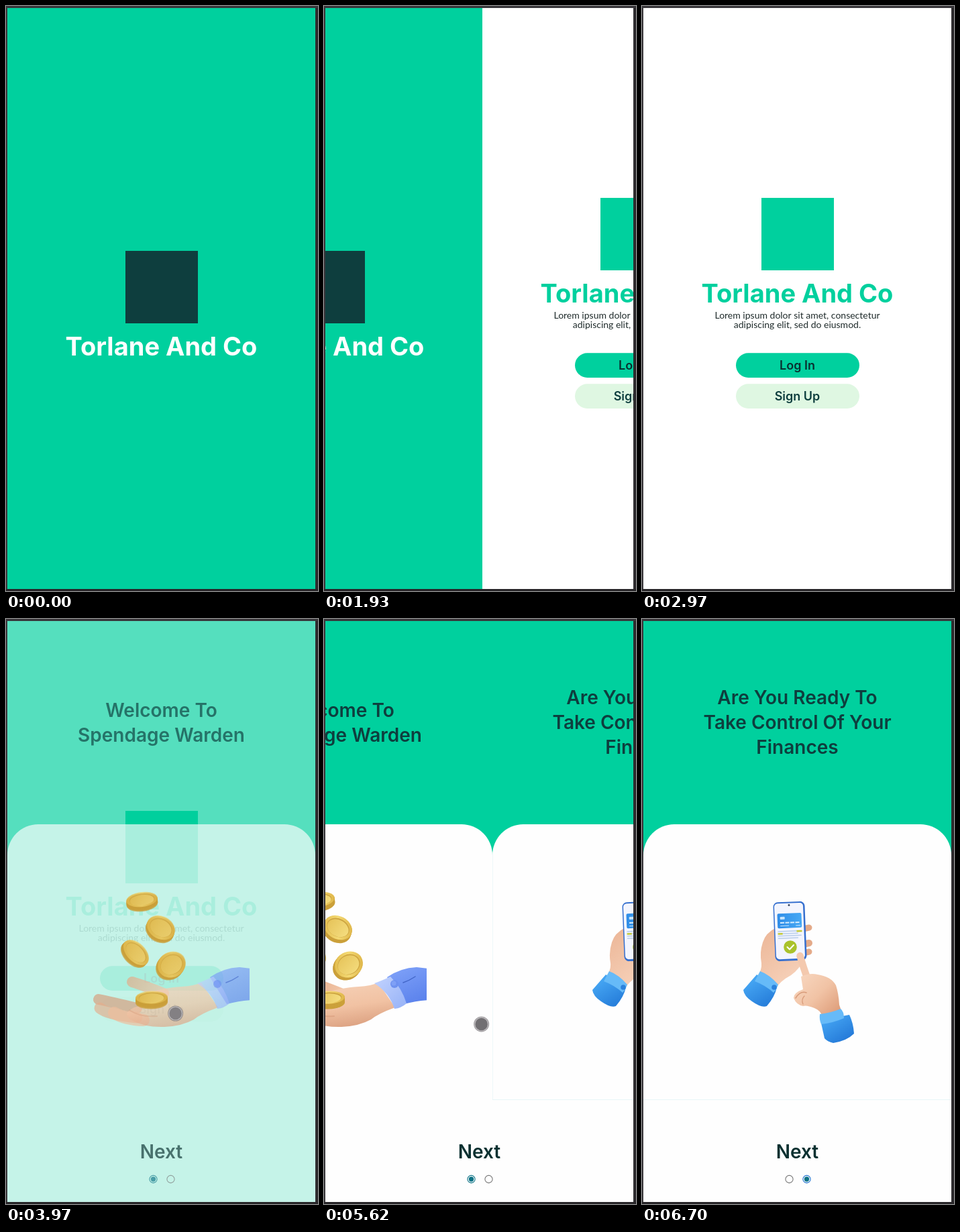
These frames come from a looping animation (465x872 px, 7030 ms). An HTML page with a canvas:

```html
<!DOCTYPE html>
<html lang="en">
<head>
<meta charset="utf-8">
<title>Finance app walkthrough</title>
<style>
  html, body { margin: 0; width: 100%; height: 100%; overflow: hidden; background: #353336; }
  canvas { display: block; width: 465px; height: 872px; }
</style>
</head>
<body>
<canvas id="stage" width="465" height="872"></canvas>
<script>
const c = document.getElementById('stage').getContext('2d');
const LOOP = 7030, STEP = 70;
const L = 2, T = 3, W = 459, H = 866, MID = 231.5;
const GREEN = '#00d09e', DEEP = '#0e3e3e', INK = '#093030', PALE = '#dff7e2';
const BRAND = 'Torlane And Co';

// Times at which a burst of motion begins; poses hold for one step
const STARTS = [0, 460, 1720, 2760, 3500, 3900, 4370, 5060, 5130, 5880, 6640, 6700];
const TRACK = [
  [460, 453, 847], [530, 413, 860], [2760, 376, 669], [2900, 315, 642],
  [3040, 290, 622], [3300, 252, 588], [4370, 253, 588], [4720, 287.5, 598],
  [5060, 449, 601], [5130, 446, 602], [5880, 122.5, 605], [6570, 379, 846], [6640, 393, 860]
];

const clamp = v => Math.min(1, Math.max(0, v));
const lerp = (a, b, k) => a + (b - a) * k;
const outCubic = k => 1 - (1 - clamp(k)) ** 3;

// cubic-bezier(.42, 0, .58, 1)
function easeInOut(x) {
  x = clamp(x);
  let lo = 0, hi = 1;
  for (let i = 0; i < 20; i++) {
    const s = (lo + hi) / 2, r = 1 - s;
    if (3 * r * r * s * 0.42 + 3 * r * s * s * 0.58 + s ** 3 < x) lo = s; else hi = s;
  }
  return lo * lo * (3 - 2 * lo);
}

function hold(t) {
  const start = STARTS.filter(s => s <= t).pop();
  return start + Math.floor((t - start) / STEP) * STEP;
}

function text(str, x, y, size, color, weight = 600, family = 'Inter') {
  c.font = `${weight} ${size}px ${family}, sans-serif`;
  c.textAlign = 'center';
  c.fillStyle = color;
  c.fillText(str, x, y);
}

function rect(x, y, w, h, color, r = 0) {
  c.fillStyle = color;
  c.beginPath();
  c.roundRect(x, y, w, h, r);
  c.fill();
}

function shape(d, fill) {
  c.fillStyle = fill;
  c.fill(new Path2D(d));
}

function line(d, color, width) {
  c.strokeStyle = color;
  c.lineWidth = width;
  c.lineCap = c.lineJoin = 'round';
  c.stroke(new Path2D(d));
}

function disc(x, y, rx, color, ry = rx, rot = 0) {
  c.fillStyle = color;
  c.beginPath();
  c.ellipse(x, y, rx, ry, rot, 0, Math.PI * 2);
  c.fill();
}

function blend(x0, y0, x1, y1, ...colors) {
  const g = c.createLinearGradient(x0, y0, x1, y1);
  colors.forEach((v, i) => g.addColorStop(i / (colors.length - 1), v));
  return g;
}

function at(x, draw, alpha = 1) {
  c.save();
  c.translate(x, 0);
  c.globalAlpha = alpha;
  draw();
  c.restore();
}

function emblem(top, mark, label) {
  rect(178, top + 4, 108, 108, mark);
  text(BRAND, MID, top + 160, 38, label, 700);
}

function splash() {
  rect(L, T, W, H, GREEN);
  emblem(361, DEEP, '#fff');
}

function login() {
  rect(L, T, W, H, '#fff');
  emblem(282, GREEN, GREEN);
  text('Lorem ipsum dolor sit amet, consectetur', MID, 466, 14, '#1f2b2b', 400, 'Lato');
  text('adipiscing elit, sed do eiusmod.', MID, 480, 14, '#1f2b2b', 400, 'Lato');
  rect(140, 517.3, 184, 36.6, GREEN, 18.3);
  rect(140, 563.3, 184, 36.6, PALE, 18.3);
  text('Log In', MID, 542, 18, INK, 600);
  text('Sign Up', MID, 588, 18, DEEP, 600);
}

function coin(x, y, rx, ry, rot, dx, dy) {
  const n = Math.ceil(Math.hypot(dx, dy));
  for (let i = n; i > 0; i--) disc(x + dx * i / n, y + dy * i / n, rx, '#cba03a', ry, rot);
  disc(x, y, rx, blend(x - rx, y, x + rx, y, '#e3bd4e', '#f4da74', '#dfb649'), ry, rot);
  disc(x, y, rx * 0.8, '#cda440', ry * 0.78, rot);
  disc(x + dx * 0.15, y + dy * 0.15, rx * 0.76, blend(x - rx, y - ry, x + rx, y + ry, '#e2bd50', '#f8e388'), ry * 0.72, rot);
}

function coinHand() {
  c.save();
  c.beginPath();
  c.rect(100, 380, 263, 260);
  c.clip();
  shape('M304 534Q324 520 348 519L366 521V568Q348 569 329 574Z', blend(320, 520, 345, 575, '#7da0f8', '#5b82ec'));
  line('M328 542Q337 539 346 533', '#4367c8', 1.5);
  const back = blend(180, 535, 230, 560, '#e3a783', '#f1c4a6');
  line('M188 541Q205 546 235 558', back, 16);
  line('M138 567Q158 571 195 580', '#d99d7c', 16);
  line('M140 580Q152 590 195 594', '#e5ae8d', 17);
  line('M161 587Q177 597 205 598', '#efbd9d', 18);
  shape('M182 585Q190 577 210 575L216 557Q232 550 262 548Q280 547 291 542L316 579Q291 588 280 597Q262 607 236 608Q207 609 187 598Q176 591 182 585Z',
    blend(240, 545, 250, 610, '#f5ceb3', '#f1c2a3', '#dba080'));
  line('M184 583Q200 594 225 592', 'rgba(200,135,102,.35)', 2);
  shape('M285 543Q294 540 309 533Q326 550 333 573Q325 580 315 581Q307 557 285 543Z',
    blend(290, 540, 330, 580, '#bdcffd', '#98b3f7'));
  disc(315, 544, 6, '#6d91f0');
  disc(314, 543, 3.5, '#7ea0f6');
  c.restore();
  coin(202.5, 418, 23.5, 11, -0.12, 0.5, 7);
  coin(231, 460, 22, 17, 0.5, -2, 5);
  coin(194, 497, 23, 14, 0.78, -4, 4);
  coin(247, 515, 21.5, 19, -0.5, -3, 4);
  coin(217, 564, 24, 9.5, -0.03, 0, 8);
}

function phoneHands() {
  const skin = blend(175, 470, 230, 545, '#ecb798', '#f7d3bc');
  shape('M200 460Q184 468 180 482Q175 497 178 513Q179 523 172 532L199 552Q205 540 222 531Q236 521 242 505Z', skin);
  for (const [y, w] of [[460, 9], [483, 10], [496, 9]]) line(`M240 ${y + 2}L249 ${y}`, '#e4aa89', w);
  shape('M171 530L201 549Q198 563 186 577Q178 580 164 570Q152 562 151 553Z', blend(160, 535, 186, 578, '#48a9f5', '#257cd9'));
  shape('M176 525Q190 530 203 545Q200 553 196 557Q184 546 168 540Z', '#66baf8');
  disc(197, 549, 3.8, '#2c82dc');

  c.save();
  c.translate(220.5, 465.5);
  c.rotate(-0.04);
  rect(-23.5, -44, 47, 88, '#356fcf', 7);
  rect(-22, -42, 43, 83, '#f3f5fe', 5);
  disc(0, -39, 1.5, '#39465f');
  rect(-18, -27, 36, 22, blend(-18, 0, 18, 0, '#2f8de8', '#46a8f4'), 2);
  rect(-14, -22, 7, 4, '#c7e4fc', 1);
  for (let i = 0; i < 4; i++) rect(-14 + i * 7.5, -14, 6, 2, '#d9edfd');
  rect(-14, -9, 13, 1.3, '#a9d5fa');
  rect(9, -9, 7, 1.3, '#a9d5fa');
  for (let i = 0; i < 4; i++) rect(-18, i * 3.4 - 1, 35 - i % 2 * 5, 1.5, '#b9cdea');
  rect(10, -1, 8, 2.5, '#c4ca32');
  rect(-18, 2, 7, 2.5, '#c4ca32');
  c.restore();
  disc(221, 489, 9.8, '#a9c22b');
  line('M216.5 489L220 492.5L226 486', '#fff', 2);

  line('M235.5 502Q240 518 248 540', '#f4c9ae', 10.5);
  shape('M237 533Q250 527 262 530Q282 533 289 546Q293 558 294 575L297 584L268 592Q267 584 257 580Q245 575 240 577Q230 575 226 565Q226 557 240 552Z',
    blend(235, 535, 288, 588, '#f7d4bc', '#f1c3a5', '#df9f7c'));
  line('M229 565Q236 554 245 557', '#d89b79', 1.5);
  line('M240 574Q237 567 242 562', '#d89b79', 1.3);
  shape('M266 598L309 590Q315 602 316 618Q305 629 285 632Q276 630 272 625Z', blend(275, 592, 300, 632, '#46a7f4', '#2479d8'));
  shape('M265 589Q282 587 296 581Q301 585 301 595Q285 602 267 604Q264 597 265 589Z', '#66baf8');
}

function page(lines, top, art) {
  lines.forEach((s, i) => text(s, MID, top + i * 37, 28, DEEP));
  rect(L, 306, W, 564, '#fefefe', [46, 46, 0, 0]);
  art();
}

function radio(x, on, ring) {
  c.strokeStyle = on ? ring : '#767676';
  c.lineWidth = 1.1;
  c.beginPath();
  c.arc(x, 835, 5.6, 0, Math.PI * 2);
  c.stroke();
  if (on) disc(x, 835, 3.7, '#0b7285');
}

// off: how far the second page still is from its resting place
function intro(off) {
  rect(L, T, W, H, GREEN);
  at(off - W, () => page(['Welcome To', 'Spendage Warden'], 146, coinHand), c.globalAlpha);
  at(off, () => {
    page(['Are You Ready To', 'Take Control Of Your', 'Finances'], 127, phoneHands);
    rect(L, 716, W, 1, '#e8f6f7');
    if (off > 0) rect(L, 350, 1, 366, '#edf8f9');
  }, c.globalAlpha);
  text('Next', MID, 804, 28, INK);
  const second = off < W / 2;
  radio(219.5, !second, '#0b7285');
  radio(245.5, second, '#1a6fd0');
}

function pointer(t) {
  let i = 0;
  while (i < TRACK.length - 2 && TRACK[i + 1][0] <= t) i++;
  const [t0, x0, y0] = TRACK[i], [t1, x1, y1] = TRACK[i + 1];
  const k = clamp((t - t0) / (t1 - t0));
  return [lerp(x0, x1, k), lerp(y0, y1, k)];
}

function cursor(t) {
  const shown = (t >= 460 && t < 600) || (t >= 2760 && t < 2960) || (t >= 3030 && t < 6700);
  if (!shown) return;
  const [x, y] = pointer(t);
  const pressed = (t >= 3500 && t < 3900) || (t >= 5060 && t < 5880);
  disc(x, y, 11.5, 'rgba(125,122,125,.75)');
  disc(x, y, 10.6, 'rgba(190,188,190,.85)');
  disc(x, y, 9.2, pressed ? 'rgba(105,103,106,.9)' : 'rgba(125,122,125,.9)');
}

function pageOffset(t) {
  if (t < 5130) return W;
  if (t < 5880) return Math.round(W - (449 - pointer(t)[0]) * 0.98);
  return Math.round(91 * (1 - outCubic((t - 5880) / 420)));
}

function draw(time) {
  const t = hold(time);
  rect(0, 0, 465, 872, '#38363a');
  rect(461, 3, 4, 869, '#2d2b2e');
  rect(0, 869, 465, 3, '#272528');
  c.save();
  c.beginPath();
  c.rect(L, T, W, H);
  c.clip();
  if (t < 2210) {
    const push = Math.round(W * easeInOut((t - 1670) / 526));
    at(-push, splash);
    if (push > 0) at(W - push, login);
    if (t >= 600 && t < 1790) shape('M405.5 857.5Q407 861 410.5 862.5Q407 864 405.5 868Q404 864 400.5 862.5Q404 861 405.5 857.5Z', '#58a998');
  } else if (t < 4040) {
    login();
    const mix = clamp((t - 3830) / 210);
    if (mix > 0) at(0, () => intro(W), mix);
  } else {
    intro(pageOffset(t));
  }
  c.restore();
  cursor(t);
}

const begin = performance.now();
function tick() {
  draw((performance.now() - begin) % LOOP);
  requestAnimationFrame(tick);
}
tick();
</script>
</body>
</html>
```
